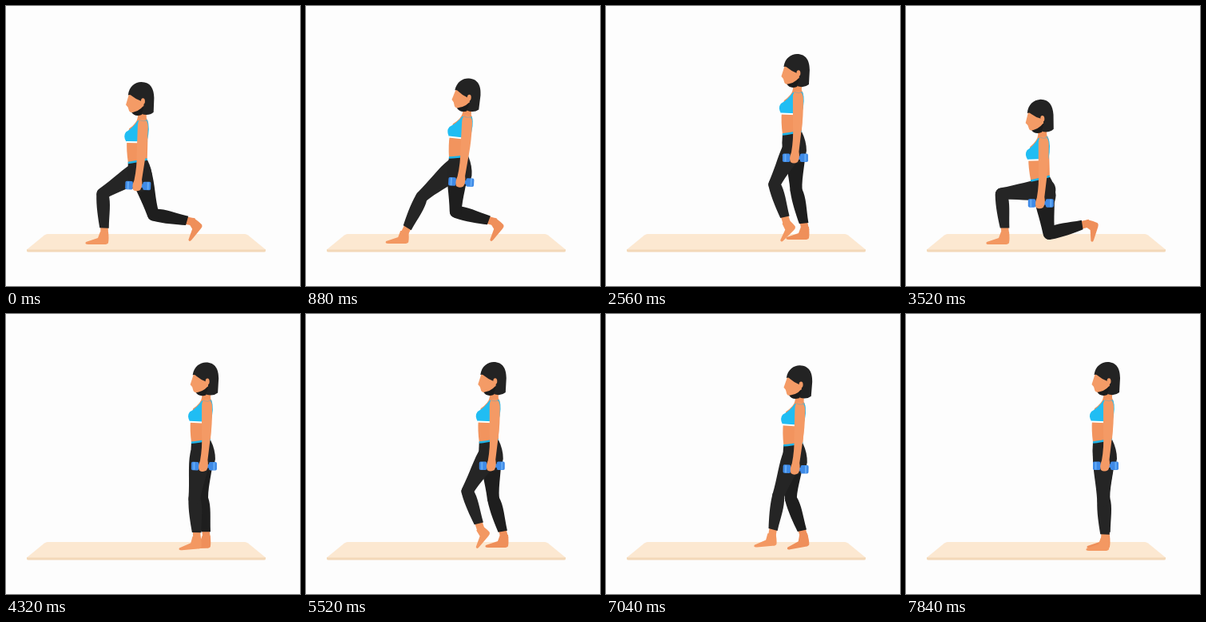
Animation, 368 px wide and 350 px high, one loop 8000 ms. Source, as an HTML page without scripts:

```html
<!DOCTYPE html>
<html lang="en">
<head>
<meta charset="utf-8">
<title>Dumbbell lunge</title>
<style>
/* b: body, a: arm, n: near leg, f: far leg */
@property --bx { syntax: "<number>"; inherits: true; initial-value: 0; }
@property --by { syntax: "<number>"; inherits: true; initial-value: 0; }
@property --lean { syntax: "<number>"; inherits: true; initial-value: 0; }
@property --arm { syntax: "<number>"; inherits: true; initial-value: 0; }
@property --nx { syntax: "<number>"; inherits: true; initial-value: 249; }
@property --ny { syntax: "<number>"; inherits: true; initial-value: 283; }
@property --nshin { syntax: "<number>"; inherits: true; initial-value: 0; }
@property --nthigh { syntax: "<number>"; inherits: true; initial-value: 0; }
@property --nfoot { syntax: "<number>"; inherits: true; initial-value: 0; }
@property --fx { syntax: "<number>"; inherits: true; initial-value: 251; }
@property --fy { syntax: "<number>"; inherits: true; initial-value: 280; }
@property --fshin { syntax: "<number>"; inherits: true; initial-value: 0; }
@property --fthigh { syntax: "<number>"; inherits: true; initial-value: 0; }
@property --ffoot { syntax: "<number>"; inherits: true; initial-value: 0; }

html, body { margin: 0; width: 100%; height: 100%; overflow: hidden; background: #fdfdfd; }
svg { display: block; width: 368px; height: 350px; }

#figure { animation: lunge 8s linear infinite; }
.near {
  --x: var(--nx); --y: var(--ny);
  --shin: var(--nshin); --thigh: var(--nthigh); --foot: var(--nfoot);
  --pants: #252525; --skin: #f39862;
}
.far {
  --x: var(--fx); --y: var(--fy);
  --shin: var(--fshin); --thigh: var(--fthigh); --foot: var(--ffoot);
  --pants: #1e1e1e; --skin: #ef8f5a;
}
.leg { transform: translate(calc(var(--x) * 1px), calc(var(--y) * 1px)); }
.foot { transform: rotate(calc(var(--foot) * 1deg)) scaleX(calc(1 + var(--foot) * .002)); }
.shin { transform: rotate(calc(var(--shin) * 1deg)); }
.thigh { transform: translateY(-50px) rotate(calc(var(--thigh) * 1deg)); }
.pants { fill: var(--pants); }
.skin { fill: var(--skin); }
.body {
  transform-origin: 247px 172px;
  transform: translate(calc(var(--bx) * 1px), calc(var(--by) * 1px)) rotate(calc(var(--lean) * 1deg));
}
.arm { transform-origin: 254px 112px; transform: rotate(calc(var(--arm) * 1deg)); }

/* A 2.9 s lunge, played two and three quarter times */
@keyframes lunge {
  /* foot lands */
  0%, 36.25%, 72.5% {
    --bx: -81; --by: 35; --lean: -1; --arm: 3;
    --nx: 123; --ny: 285; --nshin: -2; --nthigh: 60; --nfoot: 0;
    --fx: 234; --fy: 270; --fshin: -79; --fthigh: 62; --ffoot: -50;
    animation-timing-function: cubic-bezier(.2, .6, .5, 1);
  }
  /* lowest point, held */
  5.25%, 8.5%, 41.5%, 44.75%, 77.75%, 81% {
    --bx: -77; --by: 57; --lean: -4; --arm: 4;
    --nx: 124; --ny: 285; --nshin: -5; --nthigh: 89; --nfoot: 0;
    --fx: 228; --fy: 272; --fshin: -104; --fthigh: 96; --ffoot: -72;
    animation-timing-function: cubic-bezier(.4, 0, .8, .8);
  }
  /* push back */
  11%, 47.25%, 83.5% {
    --bx: -56; --by: 30; --lean: 4; --arm: -1;
    --nx: 123; --ny: 284; --nshin: 26; --nthigh: 23; --nfoot: 0;
    --fx: 236; --fy: 270; --fshin: -75; --fthigh: 77; --ffoot: -50;
  }
  14.75%, 51%, 87.25% {
    --bx: -17; --by: 6; --lean: 2; --arm: 0;
    --nx: 192; --ny: 275; --nshin: 16; --nthigh: 10; --nfoot: -5;
    --fx: 246; --fy: 277; --fshin: -25; --fthigh: 30; --ffoot: -15;
    animation-timing-function: cubic-bezier(.3, .5, .6, 1);
  }
  18.75%, 55%, 91.25% {
    --bx: -1; --by: 0; --lean: 0; --arm: 0;
    --nx: 242; --ny: 281; --nshin: -4; --nthigh: 10; --nfoot: -5;
    --fx: 251; --fy: 280; --fshin: -4; --fthigh: 4; --ffoot: 0;
    animation-timing-function: ease-out;
  }
  /* stand, held */
  22%, 27.5%, 58.25%, 63.75%, 94.5%, 100% {
    --bx: 0; --by: 0; --lean: 0; --arm: 0;
    --nx: 249; --ny: 283; --nshin: -2; --nthigh: 2; --nfoot: 0;
    --fx: 250; --fy: 280; --fshin: -2; --fthigh: 2; --ffoot: 0;
    animation-timing-function: ease-in;
  }
  /* step forward */
  32%, 68.25% {
    --bx: -13; --by: 0; --lean: 0; --arm: 0;
    --nx: 226; --ny: 271; --nshin: -17; --nthigh: 44; --nfoot: -45;
    --fx: 249; --fy: 279; --fshin: -12; --fthigh: 10; --ffoot: 0;
  }
  32.75%, 69% {
    --bx: -17; --by: 0; --lean: 0; --arm: 0;
    --nx: 219; --ny: 269; --nshin: -19; --nthigh: 49; --nfoot: -50;
    --fx: 248; --fy: 279; --fshin: -15; --fthigh: 11; --ffoot: 0;
  }
  34.75%, 71% {
    --bx: -52; --by: 17; --lean: 0; --arm: 2;
    --nx: 138; --ny: 278; --nshin: 18; --nthigh: 28; --nfoot: 8;
    --fx: 243; --fy: 275; --fshin: -48; --fthigh: 36; --ffoot: -25;
  }
}
</style>
</head>
<body>
<svg viewBox="0 0 368 350">
  <path d="M26 304 H325 V306 Q325 307.500 323 307.500 H28 Q26 307.500 26 306Z" fill="#f3d8b8"/>
  <path d="M52 285 H299 Q301 285 303 286.500 L325 304.500 H26 L48 286.500 Q50 285 52 285Z" fill="#fce8d1"/>

  <g id="figure">
    <g class="leg far">
      <path class="skin foot" d="M-5 -3 H5 Q6 6 5 11 Q4 13 0 13 H-20 Q-25 13 -23 10 L-8 5Z"/>
      <g class="shin">
        <path class="skin" d="M-4.500 -12 H5 V2 H-4.500Z"/>
        <path class="pants" d="M-5.500 -8 C-7 -20 -9 -35 -8 -50 A7.500 7.500 0 0 1 7 -50 C10 -38 7 -25 6 -7Z"/>
        <path class="pants thigh" d="M-8 0 C-9 -20 -14 -40 -13 -55 A13 13 0 0 1 13 -55 C13 -35 7 -18 7 0 A7.500 7.500 0 0 1 -8 0Z"/>
      </g>
    </g>

    <g class="leg near">
      <path class="skin foot" d="M-5 -3 H5 Q6 6 5 11 Q4 13 0 13 H-20 Q-25 13 -23 10 L-8 5Z"/>
      <g class="shin">
        <path class="skin" d="M-4.500 -12 H5 V2 H-4.500Z"/>
        <path class="pants" d="M-5.500 -8 C-7 -20 -9 -35 -8 -50 A7.500 7.500 0 0 1 7 -50 C10 -38 7 -25 6 -7Z"/>
        <path class="pants thigh" d="M-8 0 C-9 -20 -14 -40 -13 -55 A13 13 0 0 1 13 -55 C13 -35 7 -18 7 0 A7.500 7.500 0 0 1 -8 0Z"/>
      </g>
    </g>

    <g class="body">
      <path d="M234 160 L258 157 Q264 169 264 181 Q262 196 250 197 Q236 196 234 182 Q233 170 234 160Z" fill="#242424"/>
      <!-- trunk and neck -->
      <path d="M248 88 H258 V105 L260 110 L258 157 L234 160 Q232 145 233 132 L236 118 Q246 111 247 104Z" fill="#f2945e"/>
      <path d="M234 160.500 Q243 159.500 258 156.500" fill="none" stroke="#1fb4e8" stroke-width="2.500"/>
      <path d="M247 108 Q241 117 232 122 Q228 127 232 134 L258 135 Q263 117 259 107Z" fill="#20bdf3"/>
      <path d="M232 134.500 L257 135.500" stroke="#fff" stroke-width="2"/>
      <!-- head -->
      <path d="M239 97 Q243 104 252 101 L257 90 L246 91Z" fill="#1c1c1c"/>
      <path d="M237 74 L232.500 88 L235 91 L236.500 96 Q238 99 243 97 Q252 95 257 86 V72Z" fill="#f49b66"/>
      <path d="M235.500 76 C237 65 245 60 252 60 C264 60 268 69 268 80 L267 98 Q261 103 252 100 Q255 94 255 86 L252 84 Q246 82 240 77 Q238 75 235.500 76Z" fill="#232323"/>
      <ellipse cx="254" cy="84" rx="2.500" ry="3.800" fill="#f49b66"/>

      <g class="arm">
        <g fill="#3f8ae6">
          <rect x="242" y="187.500" width="16" height="4.500"/>
          <rect x="234" y="184.500" width="9.500" height="10.500" rx="1.800"/>
          <rect x="256" y="184.500" width="10" height="10.500" rx="1.800"/>
        </g>
        <path d="M237.500 185 V194.500 M262.500 185 V194.500" stroke="#65acf5" stroke-width="2"/>
        <path d="M247 114 Q247 106 253 106 Q260 107 260 116 Q260 140 258 153 L254.500 182 Q256 190 253 195 Q248 198 244 195 Q242 190 245 183 Q248 166 247 150Z" fill="#f49a65"/>
        <path d="M249 107.500 Q254 110 259 107.500" fill="none" stroke="#b69d88"/>
      </g>
    </g>
  </g>
</svg>
</body>
</html>
```
